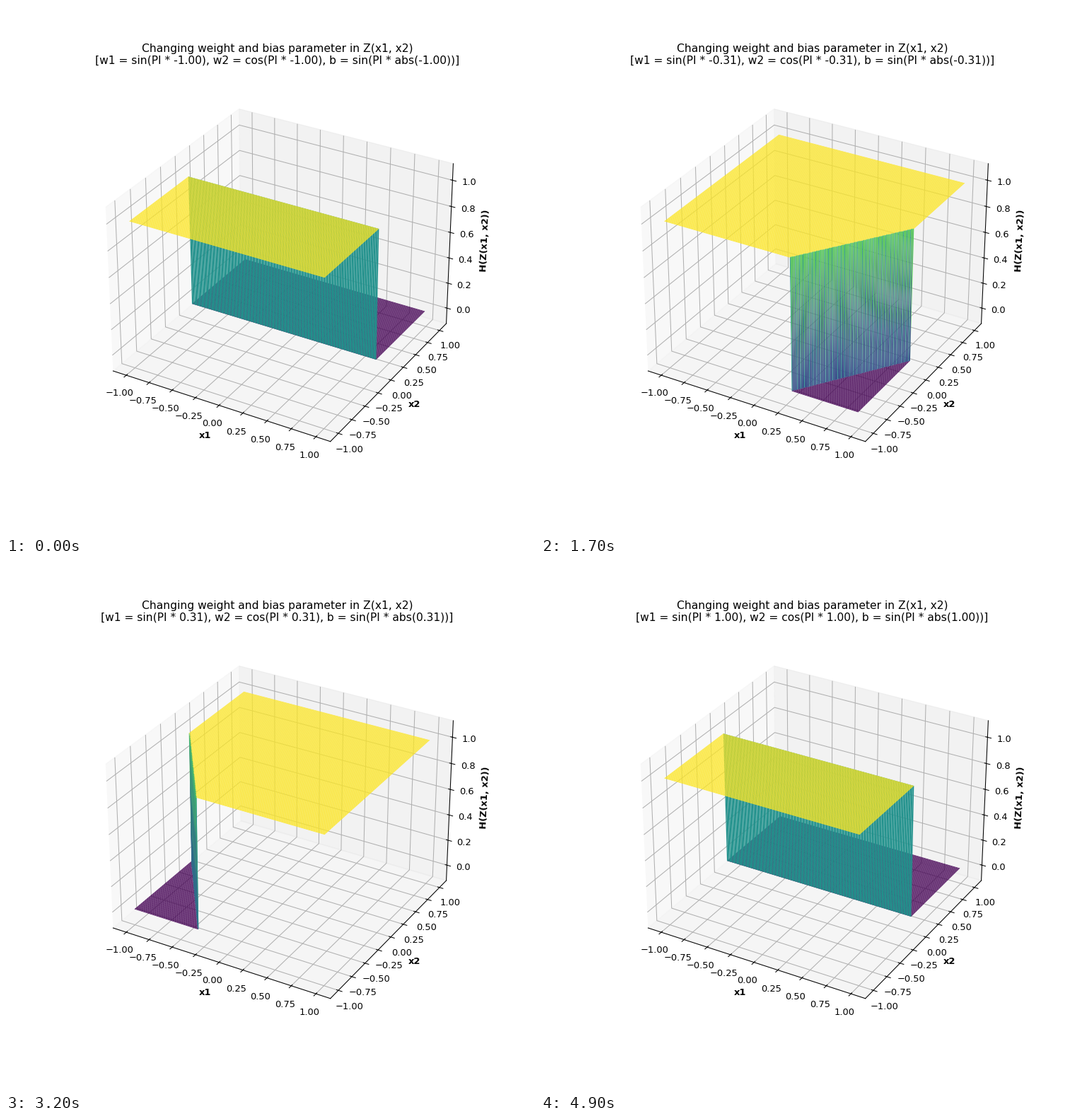
A matplotlib script that plays this animation: 748 by 748 pixels, repeating every 5000 ms.

```python
import numpy as np
import matplotlib.pyplot as plt
from matplotlib.animation import FuncAnimation
from matplotlib.collections import QuadMesh
from mpl_toolkits.mplot3d import proj3d

FRAMES, INTERVAL = 50, 100
LIMIT = 1.1 * 25 / 24

fig = plt.figure(figsize=(8.0215, 8.0215), dpi=93.25)  # 748 px square
ax = fig.add_subplot(projection="3d")
ax.set_box_aspect((4, 4, 3), zoom=0.95)
ax.set(xlim=(-LIMIT, LIMIT), ylim=(-LIMIT, LIMIT), zlim=(-0.125, 1.125))
ax.set_xticks(np.linspace(-1, 1, 9))
ax.set_yticks(np.linspace(-1, 1, 9))
ax.set_zticks(np.linspace(0, 1, 6))
for axis, label in ((ax.xaxis, "x1"), (ax.yaxis, "x2"), (ax.zaxis, "H(Z(x1, x2))")):
    axis.set_label_text(label, fontweight="bold")

# Rows run back to front, so drawing the mesh in order hides what lies behind.
side = np.arange(-1, 1, 0.01)
x1, x2 = np.meshgrid(side, side[::-1])
proj = ax.get_proj()


def project(height):
    u, v, _ = proj3d.proj_transform(x1.ravel(), x2.ravel(),
                                    np.full(x1.size, height), proj)
    return np.stack([u, v], axis=-1).reshape(*x1.shape, 2)


floor, roof = project(0.0), project(1.0)
surface = None


def update(i):
    global surface
    if surface is not None:
        surface.remove()
    t = -1 + 2 * i / (FRAMES - 1)
    w1, w2, b = np.sin(np.pi * t), np.cos(np.pi * t), np.sin(np.pi * abs(t))
    step = np.heaviside(w1 * x1 + w2 * x2 + b, 1)
    cell = (step[:-1, :-1] + step[1:, :-1] + step[:-1, 1:] + step[1:, 1:]) / 4

    points = np.where(step[..., None] > 0, roof, floor)
    surface = QuadMesh(points, antialiased=True, array=cell, cmap="viridis",
                       linewidth=0, edgecolors="none", transform=ax.transData,
                       zorder=5)
    surface.set_clim(0, 1)
    fig.add_artist(surface)
    ax.set_title("Changing weight and bias parameter in Z(x1, x2)\n"
                 f"[w1 = sin(PI * {t:.2f}), w2 = cos(PI * {t:.2f}), "
                 f"b = sin(PI * abs({t:.2f}))]")
    return [surface]


anim = FuncAnimation(fig, update, frames=FRAMES, interval=INTERVAL,
                     init_func=lambda: [], repeat=True, repeat_delay=0)
plt.show()
```
